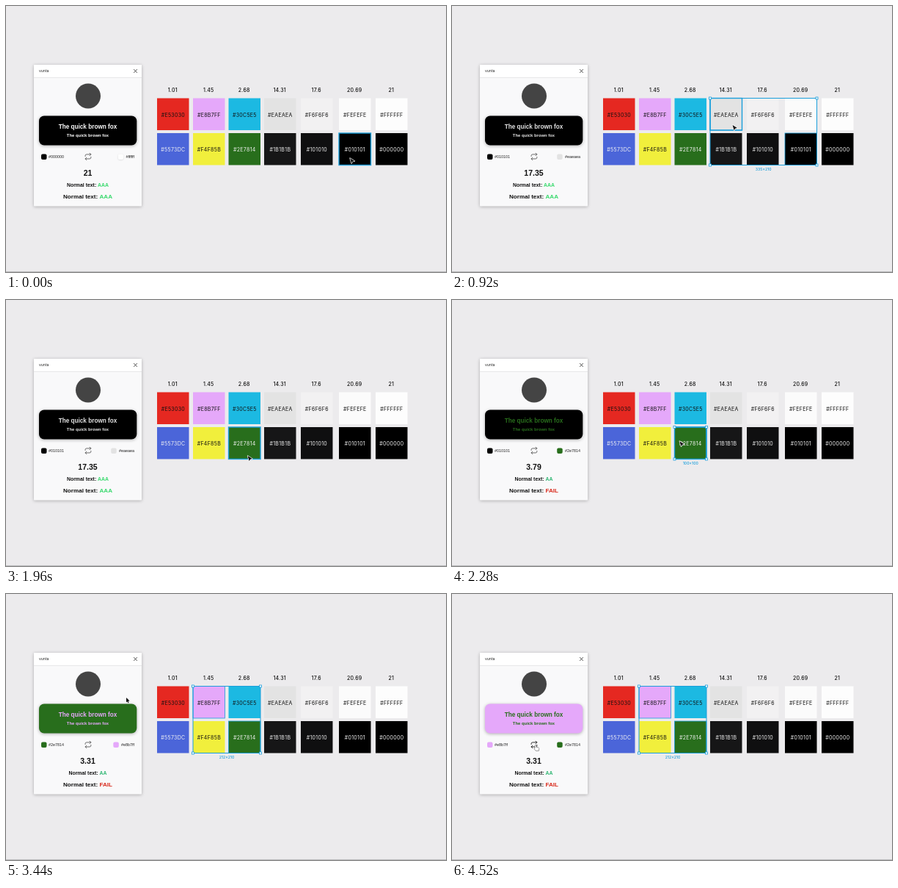
Animation, 600 px wide and 362 px high, one loop 4.56 s. Source, as an HTML page with a canvas:

```html
<!DOCTYPE html>
<html lang="en">
<head>
<meta charset="utf-8">
<title>Contrast checker</title>
<style>
html, body { margin: 0; width: 100%; height: 100%; overflow: hidden; background: #ecebed; }
canvas { display: block; width: 600px; height: 362px; }
</style>
</head>
<body>
<canvas id="stage"></canvas>
<script>
const canvas = document.getElementById('stage');
const ctx = canvas.getContext('2d');
const dpr = window.devicePixelRatio || 1;
canvas.width = 600 * dpr;
canvas.height = 362 * dpr;

const LOOP = 4560, STEP = 40, SIZE = 43.5;
const BLUE = '#1b9fdb';
const SANS = 'Inter, sans-serif', ARIAL = '"Liberation Sans", Arial, sans-serif';

// x, ratio, then label and paint for the upper and lower swatch
const columns = [
  [206, '1.01', 'E53030', '#e52821', '5573DC', '#4b65d9'],
  [255, '1.45', 'E8B7FF', '#e5a8fa', 'F4F85B', '#f1ef3c'],
  [303.5, '2.68', '30C5E5', '#1cb9e2', '2E7814', '#286e1c'],
  [352, '14.31', 'EAEAEA', '#e3e3e3', '1B1B1B', '#161617'],
  [402, '17.6', 'F6F6F6', '#f2f1f2', '101010', '#0f0f10'],
  [454, '20.69', 'FEFEFE', '#fbfbfb', '010101', '#000'],
  [504, '21', 'FFFFFF', '#fdfdfd', '000000', '#000']
];
const swatches = columns.flatMap(([x, , top, topFill, low, lowFill]) => [
  { x, y: 125.5, name: top, fill: topFill, ink: '#111' },
  { x, y: 173, name: low, fill: lowFill, ink: low === 'F4F85B' ? '#111' : '#f4f4f4' }
]);
const find = name => swatches.find(s => s.name === name);

// start time, background, text colour, ratio, small grade, large grade
const checks = [
  [0, '000000', 'FFFFFF', '21', 'AAA', 'AAA'],
  [160, '000000', '010101', '1', 'FAIL', 'FAIL'],
  [800, '010101', 'EAEAEA', '17.35', 'AAA', 'AAA'],
  [2040, '010101', '2E7814', '3.79', 'AA', 'FAIL'],
  [2560, '2E7814', 'E8B7FF', '3.31', 'AA', 'FAIL'],
  [4240, 'E8B7FF', '2E7814', '3.31', 'AA', 'FAIL']
];
const selections = [
  [0, []],
  [160, ['010101'], '100×100'],
  [800, ['010101', 'EAEAEA'], '335×210'],
  [1400, []],
  [2040, ['2E7814'], '100×100'],
  [2560, ['2E7814', 'E8B7FF'], '212×210']
];
const path = [
  [0, 469, 207], [160, 469, 207], [520, 413.5, 169], [760, 382.5, 162],
  [960, 382.5, 162], [1360, 362, 237], [1480, 362, 237], [1920, 329.5, 212],
  [2080, 329.5, 212], [2520, 285, 166], [2680, 285, 166], [3440, 164, 141],
  [4040, 114, 205.5], [LOOP, 114, 205.5]
];
const gradeInk = { AAA: '#36d96b', AA: '#2fb673', FAIL: '#d92a1c' };

const current = (list, t) => list.filter(e => e[0] <= t).pop();

function pointer(t) {
  const i = path.findIndex(p => p[0] > t);
  const [t0, x0, y0] = path[i - 1], [t1, x1, y1] = path[i];
  const u = (t - t0) / (t1 - t0), e = u * u * (3 - 2 * u);
  return [x0 + (x1 - x0) * e, y0 + (y1 - y0) * e];
}

function text(str, x, y, size, fill, { font = SANS, weight = 400, align = 'center', gap = 0 } = {}) {
  ctx.font = `${weight} ${size}px ${font}`;
  ctx.letterSpacing = gap + 'px';
  ctx.textAlign = align;
  ctx.fillStyle = fill;
  ctx.fillText(str, x, y);
}

function box(x, y, w, h, r, fill) {
  ctx.fillStyle = fill;
  ctx.beginPath();
  ctx.roundRect(x, y, w, h, r);
  ctx.fill();
}

function shadow(color, blur, y) {
  ctx.shadowColor = color;
  ctx.shadowBlur = blur * dpr;
  ctx.shadowOffsetY = y * dpr;
}

function outline(x, y, w, h, width = 1) {
  ctx.strokeStyle = BLUE;
  ctx.lineWidth = width;
  ctx.strokeRect(x, y, w, h);
}

function line(d, color, width) {
  ctx.strokeStyle = color;
  ctx.lineWidth = width;
  ctx.stroke(new Path2D(d));
}

function drawSwatches() {
  const label = { gap: 0.3 };
  for (const [x, ratio] of columns)
    text(ratio, x + 21.2, 116.7, 7, '#111', { weight: 500, gap: 0.2 });
  for (const s of swatches) {
    box(s.x, s.y, SIZE, SIZE, 0, s.fill);
    text('#' + s.name, s.x + SIZE / 2 + 0.1, s.y + 25, 7, s.ink, label);
  }
}

function drawSelection(t, px, py) {
  const [, names, size] = current(selections, t);
  const over = swatches.find(s =>
    px >= s.x && px <= s.x + SIZE && py >= s.y && py <= s.y + SIZE + 0.5);
  if (over) outline(over.x, over.y, SIZE, SIZE, 1.4);
  if (!names.length) return;

  const picked = names.map(find);
  const xs = picked.map(s => s.x), ys = picked.map(s => s.y);
  const l = Math.min(...xs), r = Math.max(...xs) + SIZE;
  const top = Math.min(...ys), bottom = Math.max(...ys) + SIZE;
  for (const s of picked) outline(s.x, s.y, SIZE, SIZE, 0.8);
  outline(l, top, r - l, bottom - top);
  for (const x of [l, r]) for (const y of [top, bottom]) {
    box(x - 1.5, y - 1.5, 3, 3, 0, '#fff');
    outline(x - 1.5, y - 1.5, 3, 3, 0.8);
  }
  text(size, (l + r) / 2, 224.2, 5.2, BLUE, { weight: 500 });
}

function chip(name, x) {
  if (name === 'FFFFFF') shadow('rgba(0,0,0,.15)', 2, 0.5);
  box(x, 201.5, 7.5, 7.5, 2, find(name).fill);
  shadow('transparent', 0, 0);
}

function grade(value, y, size) {
  const prefix = 'Normal text: ', style = { font: ARIAL, weight: 700, align: 'left' };
  ctx.font = `700 ${size}px ${ARIAL}`;
  ctx.letterSpacing = '0px';
  const lead = ctx.measureText(prefix).width;
  const x = 111.5 - (lead + ctx.measureText(value).width) / 2;
  text(prefix, x, y, size, '#111', style);
  text(value, x + lead, y, size, gradeInk[value], style);
}

function drawPanel(t) {
  const [, back, fore, ratio, small, large] = current(checks, t);
  const bold = { font: ARIAL, weight: 700 };

  shadow('rgba(0,0,0,.28)', 4, 0.8);
  box(38, 80, 147, 192.5, 1, '#f9f9fa');
  shadow('transparent', 0, 0);
  box(38, 80, 147, 17, [1, 1, 0, 0], '#fff');
  box(38, 97, 147, 0.7, 0, '#e2e2e3');
  text('vunta', 45, 90.3, 5.1, '#222', { align: 'left' });
  line('M174.2 86.2l4.6 4.6m0 -4.6l-4.6 4.6', '#222', 0.8);

  ctx.fillStyle = '#444';
  ctx.beginPath();
  ctx.arc(112, 122.5, 17, 0, 7);
  ctx.fill();

  shadow('rgba(0,0,0,.3)', 4, 1);
  box(45, 149.5, 133.3, 40, 7, find(back).fill);
  shadow('transparent', 0, 0);
  const ink = find(fore).fill;
  text('The quick brown fox', 111.5, 167, 8.2, ink, bold);
  text('The quick brown fox', 111.5, 178, 5.9, ink, bold);

  const hex = { font: ARIAL, align: 'left' };
  chip(back, 48);
  text('#' + back.toLowerCase(), 58, 207.1, 5.4, '#222', hex);
  const code = '#' + fore.toLowerCase();
  const left = 175 - ctx.measureText(code).width;
  chip(fore, left - 10.8);
  text(code, left, 207.1, 5.4, '#222', hex);

  ctx.save();
  ctx.translate(106.8, 199.8);
  ctx.scale(0.43, 0.43);
  ctx.lineCap = ctx.lineJoin = 'round';
  line('M17 1l4 4-4 4M3 11V9a4 4 0 0 1 4-4h14M7 23l-4-4 4-4M21 13v2a4 4 0 0 1-4 4H3',
    t >= 4000 ? '#111' : '#555', 2);
  ctx.restore();

  text(ratio, 111.5, 230.8, 10.5, '#111', bold);
  grade(small, 245.9, 6.9);
  grade(large, 262, 8.1);
}

const arrow = 'M0 0L2.2 7.2L3.6 4.7L6.4 4Z';
const systemArrow = 'M0 0V6.4L1.5 5.2L2.5 7.5L3.6 7L2.6 4.8L4.6 4.6Z';
const hand = 'M-.7 .4Q0 -.6 .7 .4V3L3.6 3.6Q4.8 4 4.6 5.2L4 8H.6L-1.6 5.2Q-1.9 4.2 -.7 4.6Z';

function drawPointer(t, x, y) {
  const onButton = t >= 4000;
  const shape = new Path2D(onButton ? hand : x < 185 ? systemArrow : arrow);
  ctx.save();
  ctx.translate(x, y);
  ctx.lineJoin = 'round';
  ctx.lineWidth = onButton ? 0.8 : 1.3;
  ctx.strokeStyle = onButton ? '#111' : '#fff';
  ctx.fillStyle = onButton ? '#fff' : '#111';
  ctx.stroke(shape);
  ctx.fill(shape);
  ctx.restore();
}

function draw(now) {
  const t = Math.floor((now % LOOP) / STEP) * STEP;
  const [x, y] = pointer(t);
  ctx.setTransform(dpr, 0, 0, dpr, 0, 0);
  box(0, 0, 600, 362, 0, '#ecebed');
  box(0, 361, 600, 1, 0, '#bdbdbf');
  drawSwatches();
  drawSelection(t, x, y);
  drawPanel(t);
  drawPointer(t, x, y);
}

const start = performance.now();
function tick() {
  draw(performance.now() - start);
  requestAnimationFrame(tick);
}
tick();
</script>
</body>
</html>
```
